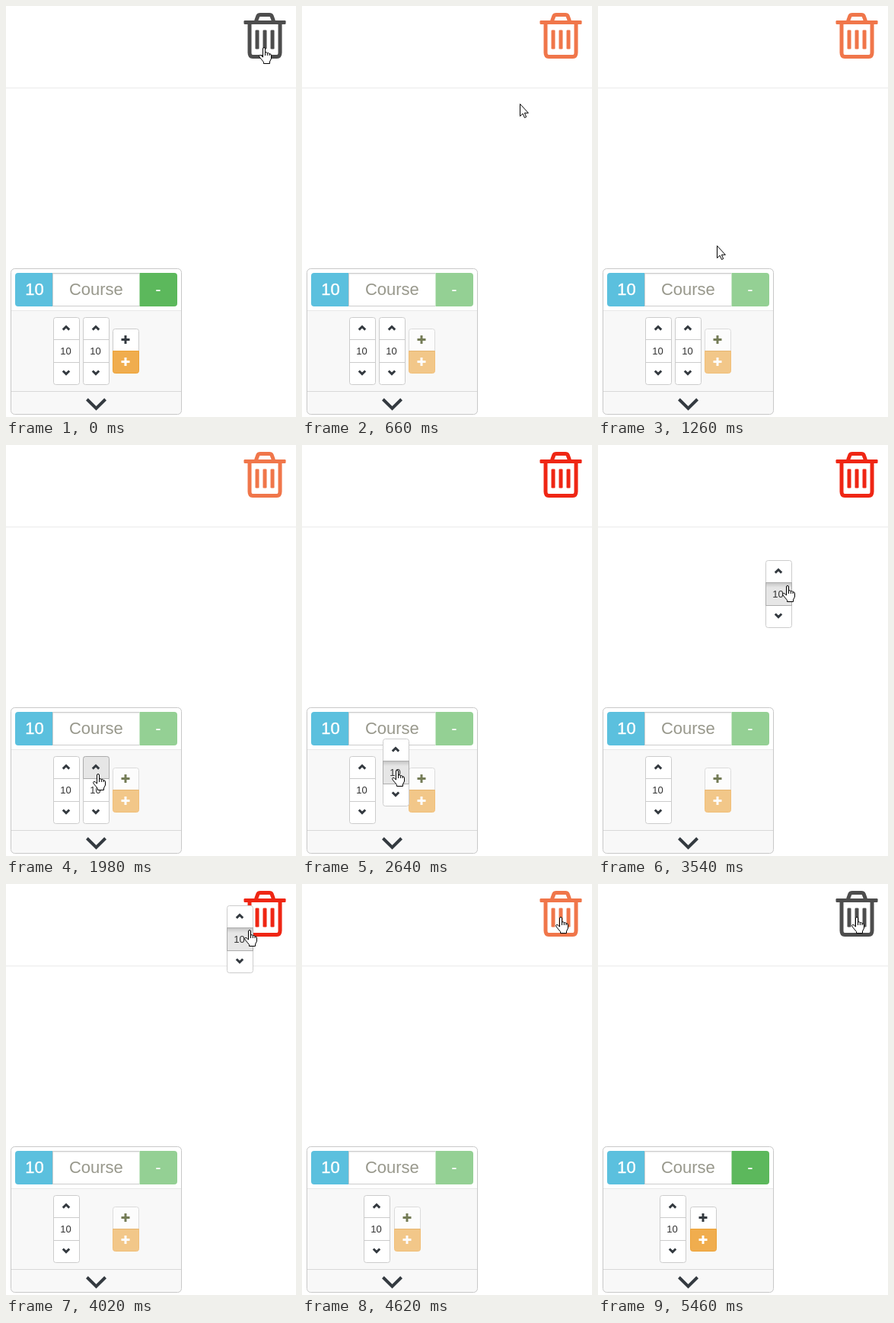
Recreate the animation shown at these times as an HTML page. Size 381x539 px, loop 6.3 s.

```html
<!DOCTYPE html>
<html lang="en">
<head>
<meta charset="utf-8">
<title>Drag to trash</title>
<style>
  html, body { margin: 0; width: 100%; height: 100%; overflow: hidden; background: #fff; }
  svg { display: block; width: 381px; height: 539px; }
  text { font-family: "Liberation Sans", Arial, sans-serif; text-anchor: middle; }
  .big { font-size: 22px; fill: #fff; }
  .small { font-size: 13px; fill: #333; }
  .icon { fill: none; stroke: #343a40; stroke-width: 3; }
  .box { fill: #fff; stroke: #ccc; }
  .over { fill: #e6e6e6; stroke: #adadad; }
  .cursor { stroke: #000; stroke-linejoin: round; fill: #fff; }
  #trash { color: #4d4d4d; }
  .editing #trash { color: #f0764a; }
  .dragging #trash { color: #ef2614; }
  .editing .btn { opacity: .65; }
  .editing .plus { stroke: #2e3a00; }
</style>
</head>
<body>
<svg id="stage" viewBox="0 0 381 539">
  <defs>
    <linearGradient id="inset" x1="0" y1="0" x2="0" y2="1">
      <stop offset="0" stop-opacity=".14"/>
      <stop offset="1" stop-opacity="0"/>
    </linearGradient>
    <path id="cap" d="M.5 29.5V3.5Q.5 .5 3.5 .5H31.5Q34.5 .5 34.5 3.5V29.5Z"/>
    <path id="cross" d="M11.5 14.5H22.5M17 9V20"/>
    <g id="frame">
      <rect class="box" x=".5" y=".5" width="34" height="88" rx="3"/>
      <path d="M0 29.5H35M0 59.5H35" stroke="#ccc"/>
    </g>
    <g id="marks">
      <path class="icon" d="M12.8 16.6L17 12.5L21.2 16.6M12.8 70.5L17 74.6L21.2 70.5"/>
      <text class="small" x="16.5" y="49">10</text>
    </g>
  </defs>

  <path d="M0 107.5H381" stroke="#eaeaea"/>

  <g id="trash" transform="translate(312.5 9) scale(.0391)" fill="none" stroke="currentColor" stroke-width="128">
    <path d="M410 270L470 110Q490 64 550 64H858Q918 64 938 110L998 270"/>
    <path d="M192 320V1332Q192 1472 296 1472H1112Q1216 1472 1216 1332V320"/>
    <g fill="currentColor" stroke="none">
      <rect y="256" width="1408" height="128" rx="32"/>
      <rect id="bar" x="384" y="576" width="128" height="640" rx="32"/>
      <use href="#bar" x="256"/>
      <use href="#bar" x="512"/>
    </g>
  </g>

  <!-- course panel -->
  <rect x="6.5" y="344.5" width="224" height="191" rx="5" fill="#f8f8f8"/>
  <path d="M7 399V349.5Q7 345 11.5 345H225.5Q230 345 230 349.5V399Z" fill="#fff"/>
  <path d="M7 399.5H230" stroke="#e8e8e8"/>
  <path d="M7 505.5H230" stroke="#d9d9d9"/>
  <rect x="6.5" y="344.5" width="224" height="191" rx="5" fill="none" stroke="#c8c8c8"/>
  <path d="M62 350H16Q12 350 12 354V390Q12 394 16 394H62Z" fill="#5bc0de"/>
  <path d="M61.5 350V394M62 350.5H175M62 393.5H175" stroke="#ccc"/>
  <rect x="62" y="351" width="113" height="2" fill="url(#inset)" opacity=".6"/>
  <text class="big" x="37.6" y="379" stroke="#fff" stroke-width=".4">10</text>
  <text class="big" x="118.4" y="379" style="fill:#98988c">Course</text>
  <g class="btn">
    <path d="M175.5 350H221Q225 350 225 354V390Q225 394 221 394H175.5Z" fill="#5cb85c"/>
    <text class="big" x="200" y="379">-</text>
  </g>
  <path class="icon" d="M106.4 515.8L118.5 527.6L130.6 515.8" style="stroke-width:4"/>

  <g id="first">
    <use href="#frame"/>
    <use href="#marks"/>
  </g>

  <g id="adder">
    <g class="btn">
      <use href="#cap" class="box"/>
      <use href="#cross" class="icon plus"/>
    </g>
    <g class="btn">
      <use href="#cap" transform="matrix(1 0 0 -1 0 59)" fill="#f0ad4e" stroke="#eea236"/>
      <use href="#cross" y="29" class="icon" style="stroke:#fff"/>
    </g>
  </g>

  <g id="second">
    <use href="#frame"/>
    <use href="#cap" id="overTop" class="over"/>
    <rect id="overMid" class="over" x=".5" y="29.5" width="34" height="30"/>
    <rect id="pressed" x="1" y="30" width="33" height="6" fill="url(#inset)"/>
    <use href="#marks"/>
  </g>

  <path id="arrow" class="cursor" d="M.5 .5V16.5L4.1 13.2L6.5 18.5L8.7 17.5L6.4 12.3H11.4Z"/>
  <g id="hand">
    <path class="cursor" transform="translate(-6)" d="M5.5 2Q5.5 .5 7 .5T8.5 2V7Q10 6 11.3 7.6Q13 7 14 8.6Q16.5 8.4 16.5 11V15L14.5 19V21.5H6.5V19.5L1.2 13.2Q0 11 1.3 10.4Q3 10 5.5 13ZV2M8.5 7V11M11.3 8V11M14 9V11"/>
  </g>
</svg>

<script>
const LOOP = 6300, STEP = 60;
const linear = p => p;
const easeOut = p => p * (2 - p);

// Each stop: arrival time, position, easing on the way there
const stop = (time, x, y, ease = linear) => ({ time, x, y, ease });
const pointer = [
  stop(420, 338, 54), stop(1260, 156, 314), stop(1740, 120, 414),
  stop(2280, 121, 452), stop(2640, 124, 426), stop(3180, 202, 261),
  stop(3540, 248, 184), stop(4380, 335, 32, easeOut), stop(4620, 339, 43)
];
const spinner = [
  stop(2280, 101, 408), stop(2640, 106, 385), stop(3180, 167, 240),
  stop(3540, 220, 151), stop(4380, 306, 0, easeOut)
];

const $ = id => document.getElementById(id);
const show = (id, on) => $(id).style.display = on ? '' : 'none';
const place = (id, x, y) => $(id).setAttribute('transform', `translate(${x} ${y})`);

function along(path, t) {
  const next = path.find(s => s.time > t) || path[path.length - 1];
  const prev = path[path.indexOf(next) - 1] || next;
  const span = next.time - prev.time || 1;
  const p = next.ease(Math.min(1, Math.max(0, (t - prev.time) / span)));
  const mix = (a, b) => Math.round(a + (b - a) * p);
  return [mix(prev.x, next.x), mix(prev.y, next.y)];
}

function draw() {
  const t = Math.floor(performance.now() % LOOP / STEP) * STEP;
  const [x, y] = along(pointer, t);
  const editing = t >= 240 && t < 5460;
  const dragging = t >= 2340 && t < 4620;
  const removed = t >= 4620;
  const pointing = t < 480 || t >= 1740;
  const hovering = t >= 1740 && !dragging;

  $('stage').classList.toggle('editing', editing);
  $('stage').classList.toggle('dragging', dragging);

  place('first', removed ? 81 : 62, 408);
  place('adder', removed ? 121 : 140, 423);
  place('second', ...along(spinner, t));
  show('second', !removed);
  show('overTop', hovering && y < 438);
  show('overMid', dragging || hovering && y >= 438);
  show('pressed', dragging);

  place('hand', x, y);
  place('arrow', x, y);
  show('hand', pointing);
  show('arrow', !pointing);
  requestAnimationFrame(draw);
}
draw();
</script>
</body>
</html>
```
